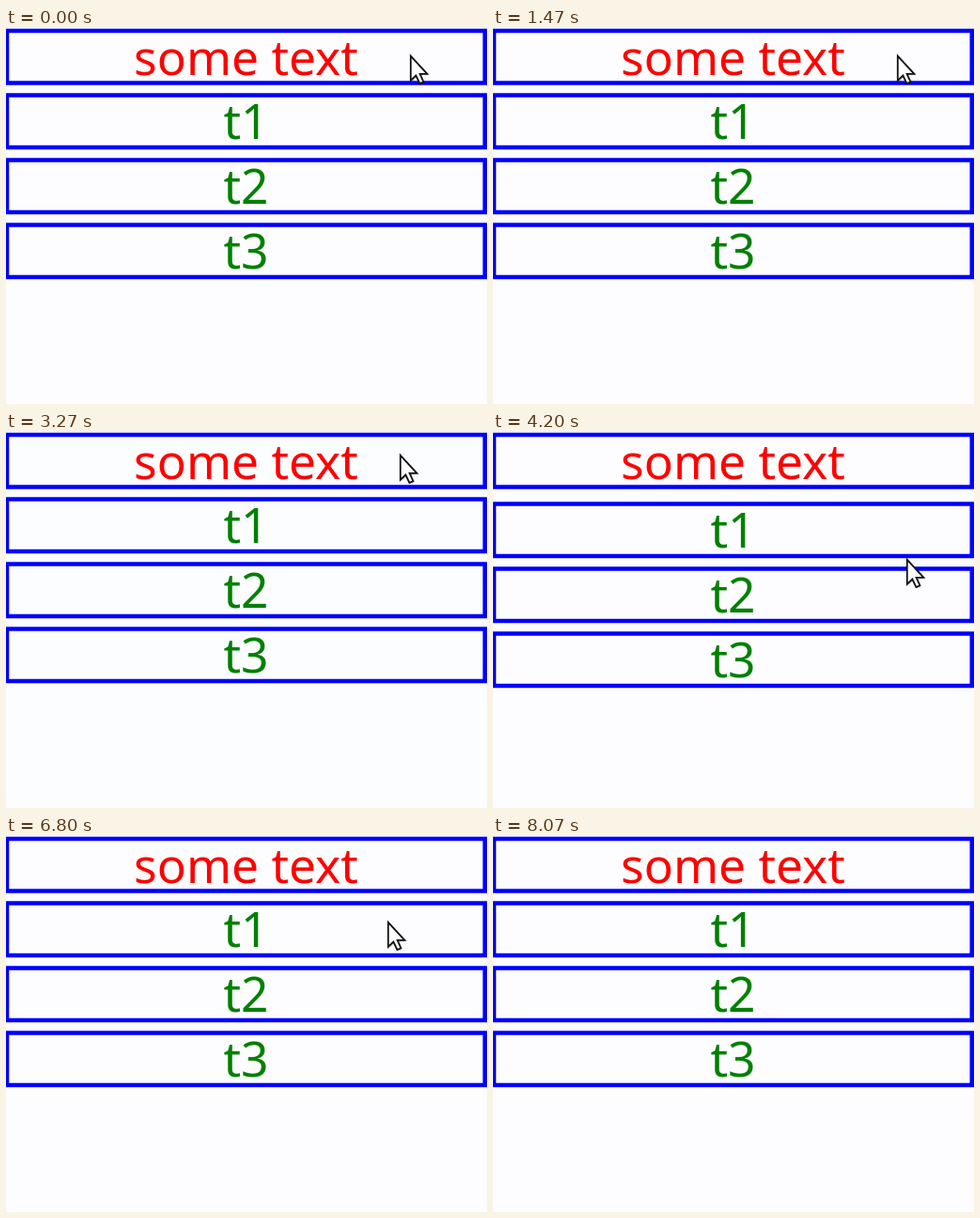
Write an HTML page with a canvas that moves like this. It is 512 px wide and 400 px high and loops after 9.47 s.

```html
<!DOCTYPE html>
<html lang="en">
<head>
<meta charset="utf-8">
<title>Click effects</title>
<style>
  html, body { margin: 0; width: 100%; height: 100%; overflow: hidden; background: #fdfdff; }
  canvas { display: block; width: 512px; height: 400px; }
</style>
</head>
<body>
<canvas id="stage" width="512" height="400"></canvas>
<script>
const ctx = document.getElementById('stage').getContext('2d');
const LOOP = 9470;
const STEP = 200 / 3;
const PITCH = 69;
const arrow = new Path2D('M0.8 0.8V27L6.4 21.6L10.4 30L14.4 28.2L10.6 19.8H18.4Z');

const clamp = k => Math.min(1, Math.max(0, k));

// Smooth rise and fall from 0 to 1 and back
const pulse = (t, start, length) => Math.sin(Math.PI * clamp((t - start) / length)) ** 2;

// Smooth rise from 0 to 1
const ease = (t, start, length) => (1 - Math.cos(Math.PI * clamp((t - start) / length))) / 2;

function pointerAt(t) {
  let x = 430, y = 29;
  const glide = (start, length, toX, toY) => {
    const k = ease(t, start, length);
    x += (toX - x) * k;
    y += (toY - y) * k;
  };
  glide(1730, 800, 419, 24);
  glide(3300, 700, 440, 135);
  glide(4300, 700, 414, 145);
  glide(6000, 470, 406, 91);
  glide(6800, 330, 396, 36);
  glide(7400, 500, 410, -40);
  return [x, y];
}

function drawRow(label, top, color) {
  ctx.strokeStyle = '#0000ff';
  ctx.lineWidth = 4.5;
  ctx.strokeRect(1, top + 2.5, 508.75, 55.5);
  ctx.fillStyle = color;
  ctx.fillText(label, 255.5, top + 49);
}

function drawPointer(x, y) {
  ctx.save();
  ctx.translate(x, y);
  ctx.lineWidth = 1.8;
  ctx.strokeStyle = '#111';
  ctx.fillStyle = '#fff';
  ctx.shadowColor = 'rgba(0,0,0,.3)';
  ctx.shadowBlur = 2;
  ctx.shadowOffsetX = ctx.shadowOffsetY = 1;
  ctx.fill(arrow);
  ctx.shadowColor = 'transparent';
  ctx.stroke(arrow);
  ctx.restore();
}

function draw(now) {
  const t = Math.floor((now % LOOP + 5) / STEP) * STEP;
  const flash = pulse(t, 0, 1470) + pulse(t, 1900, 1400) + pulse(t, 7200, 870);
  const drop = Math.round(33 * pulse(t, 4070, 1000) + 24.5 * pulse(t, 5470, 1000));

  ctx.fillStyle = '#fdfdff';
  ctx.fillRect(0, 0, 512, 400);
  ctx.fillStyle = `rgba(100, 149, 237, ${flash})`;
  ctx.fillRect(0, 0, 512, 400);

  ctx.font = '51.5px "Noto Sans", "Open Sans", sans-serif';
  ctx.textAlign = 'center';
  drawRow('some text', 0.5, '#ff0000');
  for (let i = 1; i <= 3; i++) drawRow('t' + i, PITCH * i + drop, '#008000');
  drawPointer(...pointerAt(t));
}

const start = performance.now();
function tick() {
  draw(performance.now() - start);
  requestAnimationFrame(tick);
}
tick();
</script>
</body>
</html>
```
